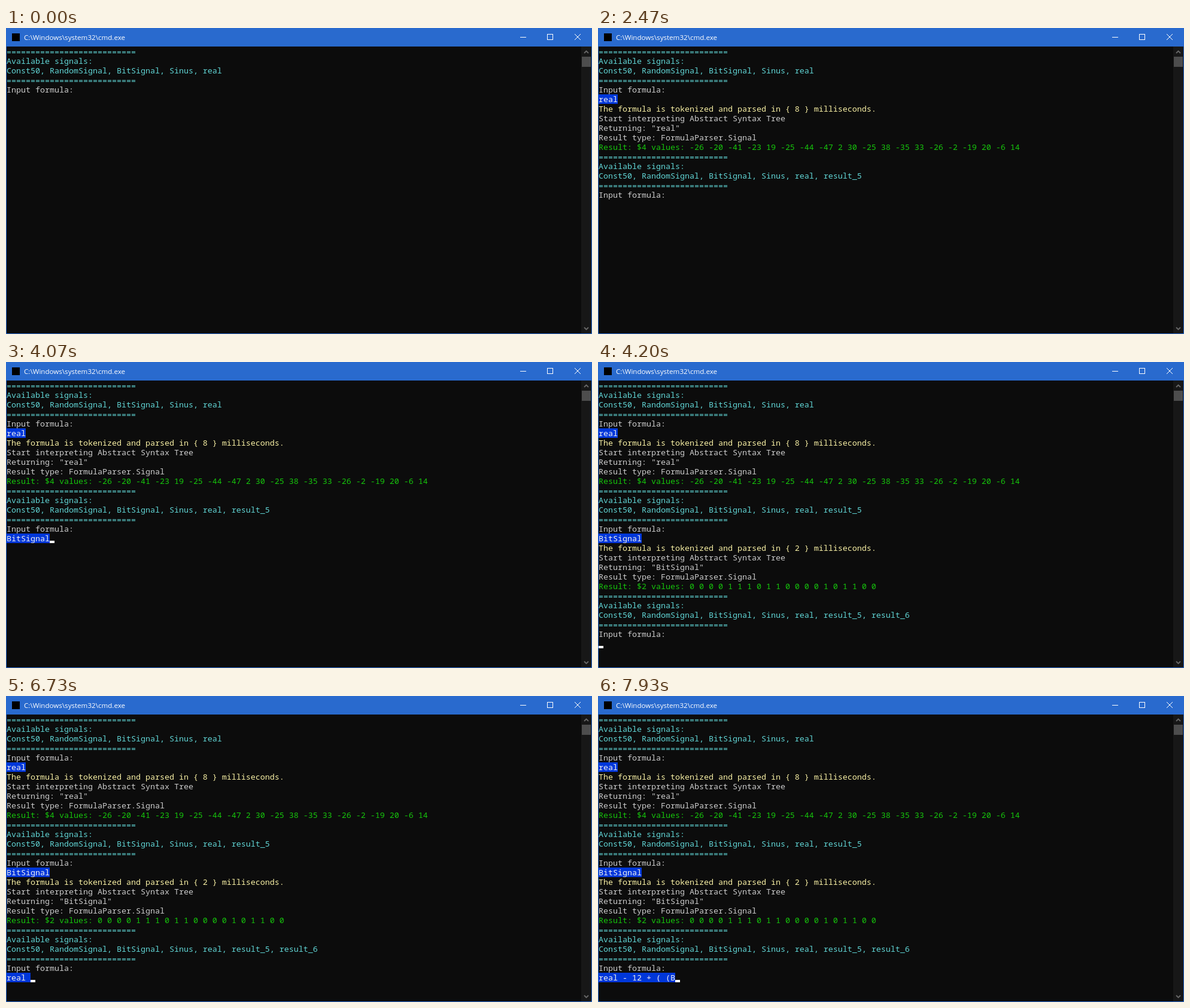
An HTML page that plays this animation: 979x512 px, repeating every 8000 ms.

```html
<!DOCTYPE html>
<html lang="en">
<head>
<meta charset="utf-8">
<title>Formula console</title>
<style>
  html, body { margin: 0; width: 100%; height: 100%; overflow: hidden; background: #296ace; }
  svg, #console, #title, #cursor { position: absolute; }
  svg { left: 0; top: 0; }
  #title { left: 30px; top: 8px; font: 11.6px/16px "Open Sans", "Noto Sans", sans-serif; color: #fff; }
  #console { left: 1px; top: 31px; width: 960px; height: 480px; background: #0c0c0c;
    font: 13.3333px/16px "Noto Sans Mono", "Liberation Mono", monospace; white-space: pre; }
  #console div { height: 16px; width: fit-content; }
  .gray { color: #ccc; }
  .cyan, .rule { color: #61d6d6; }
  .rule { position: relative; top: 1px; }
  .yellow { color: #f9f1a5; }
  .green { color: #16c60c; }
  .input { color: #f2f2f2; background: #0037da; }
  #console #cursor { width: 8px; height: 4px; background: #fff; }
</style>
</head>
<body>
<svg width="979" height="512" shape-rendering="crispEdges">
  <rect x="10" y="9" width="13" height="13" fill="#000"/>
  <path d="M859 15.5h10M904.5 10.5h9v9h-9z" fill="none" stroke="#fff"/>
  <path d="M950 10l10 10m0-10l-10 10" stroke="#fff" shape-rendering="auto"/>
  <rect x="961" y="31" width="17" height="480" fill="#171717"/>
  <rect x="962" y="48" width="15" height="17" fill="#4d4d4d"/>
  <path d="M966 42l3.5-3.5l3.5 3.5M966 501l3.5 3.5l3.5-3.5" fill="none" stroke="#686868" stroke-width="1.8" shape-rendering="auto"/>
</svg>
<div id="title">C:\Windows\system32\cmd.exe</div>
<div id="console"><div id="cursor"></div></div>
<script>
const LOOP = 8000, TICK = 1000 / 15;
const BLINK = 533, BLINK_START = 330;
const screen = document.getElementById('console');
const cursor = document.getElementById('cursor');
const rows = [];

// The screen refreshes 15 times a second, on a 10 ms clock
const snap = ms => Math.round(Math.round(ms / TICK) * TICK / 10) * 10;

function addRow(at, style, text, keys) {
  const el = document.createElement('div');
  el.className = style;
  el.textContent = text;
  screen.append(el);
  rows.push({ at, el, text, keys });
}

function prompt(at, extra = '') {
  const rule = '='.repeat(27);
  addRow(at, 'rule', rule);
  addRow(at, 'cyan', 'Available signals:');
  addRow(at, 'cyan', 'Const50, RandomSignal, BitSignal, Sinus, real' + extra);
  addRow(at, 'rule', rule);
  addRow(at, 'gray', 'Input formula:');
}

// Steady typing: first key at from, last key at to
function typeIn(text, from, to) {
  const step = (to - from) / (text.length - 1);
  const keys = [...text].map((_, i) => snap(from + i * step));
  addRow(keys[0], 'input', text, keys);
}

function parsed(at, name, ms) {
  addRow(at, 'yellow', `The formula is tokenized and parsed in { ${ms} } milliseconds.`);
  addRow(at, 'gray', 'Start interpreting Abstract Syntax Tree');
  addRow(at, 'gray', `Returning: "${name}"`);
}

function result(at, values) {
  addRow(at, 'gray', 'Result type: FormulaParser.Signal');
  addRow(at, 'green', 'Result: ' + values);
}

prompt(-1000);
typeIn('real', 670, 970);
parsed(1070, 'real', 8);
result(1400, '$4 values: -26 -20 -41 -23 19 -25 -44 -47 2 30 -25 38 -35 33 -26 -2 -19 20 -6 14');
prompt(1400, ', result_5');
typeIn('BitSignal', 3200, 4070);
parsed(4200, 'BitSignal', 2);
result(4200, '$2 values: 0 0 0 0 1 1 1 0 1 1 0 0 0 0 1 0 1 1 0 0');
prompt(4200, ', result_5, result_6');
typeIn('real - 12 + ( (B', 6320, 7925);

// The cursor stays on for the first blink after it moves, then alternates
function cursorOn(t, moved) {
  const beat = ms => Math.floor((ms - BLINK_START) / BLINK);
  const beats = beat(t) - beat(moved);
  return beats === 0 || beats % 2 === 1;
}

function draw(t) {
  let line = 0, col = 0, moved = 0;
  rows.forEach(({ at, el, text, keys }, i) => {
    const shown = t >= at;
    el.style.visibility = shown ? 'visible' : 'hidden';
    if (!shown) return;
    line = i + 1;
    col = 0;
    moved = at;
    if (keys) {
      col = keys.filter(k => k <= t).length;
      el.textContent = text.slice(0, col);
      line = i;
      moved = keys[col - 1];
    }
  });
  cursor.style.left = col * 8 + 'px';
  cursor.style.top = line * 16 + 12 + 'px';
  cursor.hidden = !cursorOn(t, moved);
}

const start = performance.now();
function tick() {
  draw((performance.now() - start) % LOOP);
  requestAnimationFrame(tick);
}
tick();
</script>
</body>
</html>
```
